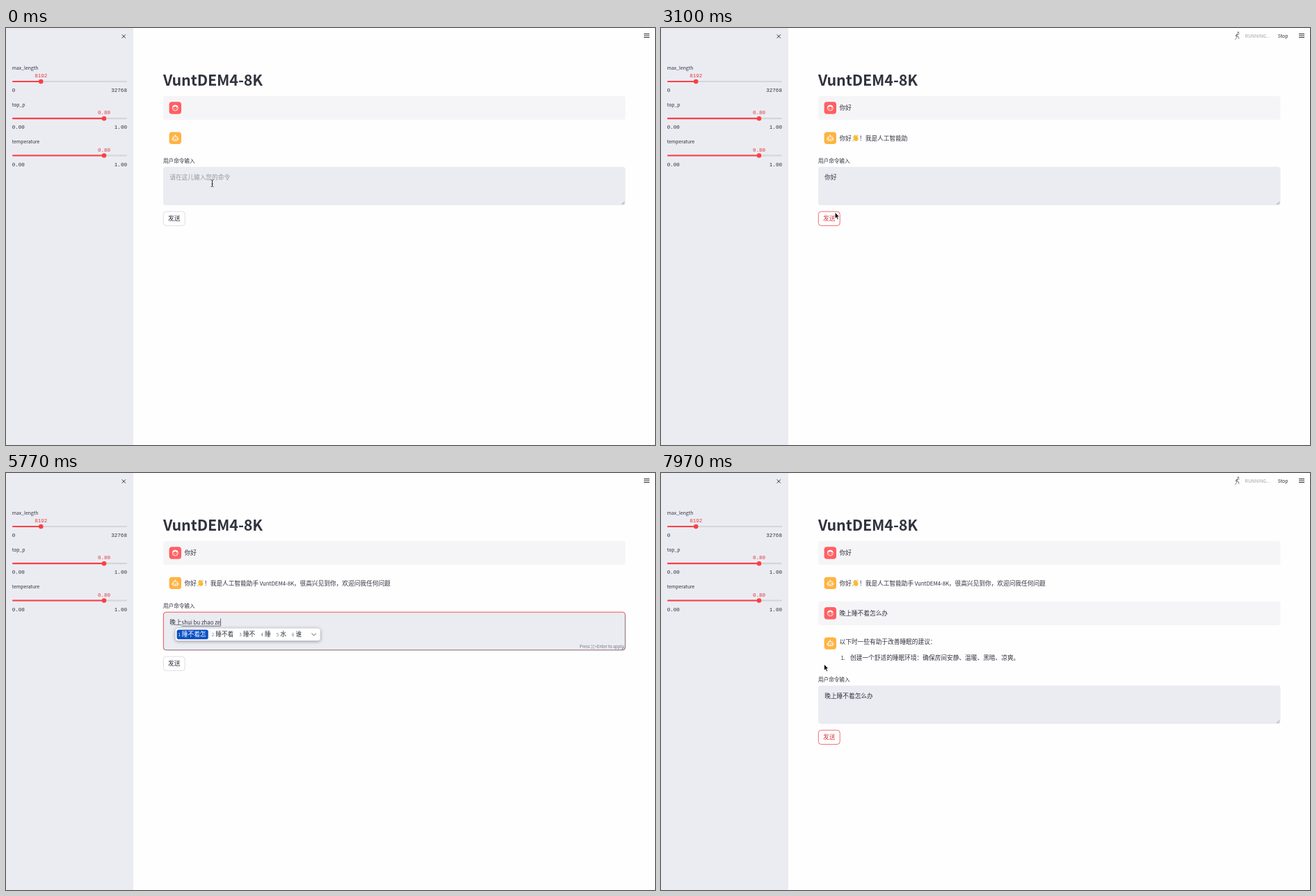
These frames come from a looping animation (933 px wide and 600 px high, 8000 ms). An HTML page:

```html
<!DOCTYPE html>
<html lang="zh-CN">
<head>
<meta charset="utf-8">
<style>
html, body { margin: 0; width: 100%; height: 100%; overflow: hidden; background: #fefefe; }
svg { display: block; width: 100%; height: 100%; }
text { font-family: "Noto Sans CJK SC", "Noto Sans CJK JP", "Noto Sans CJK", "Noto Sans", sans-serif; fill: #31333f; white-space: pre; }
.mono { font-family: "Liberation Mono", monospace; }
</style>
</head>
<body>
<svg viewBox="0 0 933 600"><g id="base"></g><g id="live"></g></svg>
<script>
const LOOP = 8000, EM = 8.7, LATIN = 7.8, SMALL = 6.8;
const RED = '#fa4044', INK = '#31333f', PANEL = '#ebecf2';
const NAME = 'VuntDEM4-8K';
const $ = id => document.getElementById(id);
const pen = document.createElement('canvas').getContext('2d');
pen.font = `${LATIN}px "Noto Sans CJK SC", "Noto Sans CJK JP", "Noto Sans CJK", "Noto Sans", sans-serif`;

const text = (x, y, s, size = EM, attr = '') => `<text x="${x}" y="${y}" font-size="${size}" ${attr}>${s}</text>`;
const rect = (x, y, w, h, r, fill, attr = '') => `<rect x="${x}" y="${y}" width="${w}" height="${h}" rx="${r}" fill="${fill}" ${attr}/>`;
const line = (d, color, w = 1, attr = '') => `<path d="${d}" fill="none" stroke="${color}" stroke-width="${w}" ${attr}/>`;
const group = (x, y, body, attr = '') => `<g transform="translate(${x} ${y})" ${attr}>${body}</g>`;
const ramp = (t, a, b) => Math.min(1, Math.max(0, (t - a) / (b - a)));
const ease = k => k * k * (3 - 2 * k);
const within = (t, a, b) => t >= a && t < b;

// Fixed parts
function slider(y, label, share, value, min, max) {
  const x = 9 + 165 * share;
  const mono = (px, py, s, anchor, fill = INK) =>
    text(px, py, s, 7.6, `class="mono" text-anchor="${anchor}" style="fill:${fill}"`);
  return text(8.7, y - 17.2, label, SMALL) + mono(x, y - 6, value, 'middle', '#dc3c40') +
    rect(9, y - 1.1, 165, 2.2, 1, '#d3d5dc') + rect(9, y - 1.1, x - 9, 2.2, 1, RED) +
    `<circle cx="${x}" cy="${y}" r="3.3" fill="${RED}"/>` +
    mono(8.7, y + 15, min, 'start') + mono(174, y + 15, max, 'end');
}

$('base').innerHTML = rect(0, 0, 183, 600, 0, PANEL) +
  line('M166.7 9.4l5.2 5.2m0 -5.2l-5.2 5.2', INK, 1) +
  slider(77, 'max_length', .25, '8192', '0', '32768') +
  slider(130.2, 'top_p', .8, '0.80', '0.00', '1.00') +
  slider(183.5, 'temperature', .8, '0.80', '0.00', '1.00') +
  line('M917 8.5h8M917 11h8M917 13.5h8', INK, 1.1) +
  text(226, 82.6, NAME, 21.5, 'font-weight="700" letter-spacing="-.1"');

// Chat rows
function userRow(y, s) {
  return rect(226, y - 17.3, 664.5, 34.6, 4, '#f5f5f7') +
    group(243.3, y, rect(-8.7, -8.7, 17.4, 17.4, 4, '#ff5f63') +
      '<circle r="4" fill="none" stroke="#fff" stroke-width=".9"/>' +
      '<path d="M-3.9 -.7C-2 -.8 -.8 -1.6 -.2 -2.6C1 -1.2 2.4 -.7 3.9 -.9A4 4 0 0 0 -3.9 -.7Z" fill="#fff"/>' +
      '<circle cx="-1.5" cy=".9" r=".6" fill="#fff"/><circle cx="1.5" cy=".9" r=".6" fill="#fff"/>') +
    text(256.5, y + 3.1, s);
}
function botRow(y) {
  return group(243.3, y, rect(-8.7, -8.7, 17.4, 17.4, 4, '#ffb340') +
    line('M-3 -2.2h6v5.8h-6zM0 -2.2v-1.6M-3.2 .2h-1.3v2h1.3M3.2 .2h1.3v2h-1.3M-1.4 2.2h2.8', '#fff', .85) +
    '<circle cy="-4.1" r=".9" fill="#fff"/><circle cx="-1.3" cy=".2" r=".65" fill="#fff"/><circle cx="1.3" cy=".2" r=".65" fill="#fff"/>');
}
const WAVE = '<g transform="rotate(-28)" stroke="#f9b934" stroke-linecap="round">' +
  '<ellipse cx=".3" cy="1.7" rx="2.9" ry="2.7" fill="#f9b934" stroke="none"/>' +
  '<path d="M-1.7 1V-3M-.1 0V-4M1.4 0V-3.5M2.7 1V-2.2M-1.8 2.4L-3.6 .4" stroke-width="1.4"/></g>' +
  line('M2 -4.6q1.6 .5 2.1 2M-4.6 2.8q.3 1.6 1.9 2.1', '#b98a4a', .6);

const GREETING = [
  [256.5, '你好', EM], [279.6, '*'], [285, '！我是人工智能助手', EM],
  [364.8, NAME, LATIN], [413.8, '，很高兴见到你，欢迎问我任何问题。', EM]
];
function greeting(y, count) {
  let out = '';
  for (const [x, s, size] of GREETING) {
    if (count <= 0) break;
    out += size ? text(x, y + 3.1, s.slice(0, count), size) : group(x, y, WAVE);
    count -= s.length;
  }
  return out;
}
const ADVICE = '以下时一些有助于改善睡眠的建议：';
const ITEM = '创建一个舒适的睡眠环境：确保房间安静、温暖、黑暗、凉爽。';
const typed = (s, t, a, b) => s.slice(0, Math.round(s.length * ramp(t, a, b)));

// Pinyin input: key times, and candidates from a given letter count on
const steps = (start, gap, n) => Array.from({ length: n }, (_, i) => start + i * gap);
const INPUTS = [
  { before: '', keys: [870, 930, 1130, 1230, 1400], pinyin: 'ni hao', end: 1700, after: '你好',
    lists: { 1: '你 那 能 年 呢 拿 女 难 内', 2: '你 尼 泥 腻 妮 拟 逆 倪 祢', 5: '你好 拟好 你号 你 尼 泥 腻 妮' } },
  { before: '', keys: steps(4000, 90, 8), pinyin: 'wan shang', end: 4830, after: '晚上',
    lists: { 1: '我 为 无 五 玩 完 问 文 网', 3: '万 完 玩 晚 弯 湾 碗 挽 婉', 4: '晚上 万事 完善 万 完 玩 晚' } },
  { before: '晚上', keys: steps(4970, 70, 18), pinyin: 'shui bu zhao zen me ban', end: 6400, after: '晚上睡不着怎么办',
    lists: { 1: '是 上 时 说 谁 水 睡 啥 事', 4: '睡 水 谁 税 说 睡觉 水果', 5: '睡不 水部 谁不 睡 水 谁 税',
      7: '睡不着 睡不 水 睡 谁 税', 11: '睡不着怎 睡不着 睡不 睡 水 谁', 13: '睡不着怎么 睡不着 睡不找 睡不 睡 水',
      16: '睡不着怎么办 睡不着怎么 睡不着 睡不找 睡不 水' } }
];

function letters(pinyin, n) {
  let i = 0;
  while (n > 0) if (pinyin[i++] !== ' ') n--;
  return pinyin.slice(0, i);
}
function inputState(t) {
  const s = { value: '', comp: '', list: '', beat: t < 3500 ? 170 : 3500 };
  for (const p of INPUTS) {
    if (t < p.keys[0]) break;
    const n = p.keys.filter(k => k <= t).length;
    const open = t < p.end;
    s.value = open ? p.before : p.after;
    s.comp = open ? letters(p.pinyin, n) : '';
    s.list = open ? p.lists[Math.max(...Object.keys(p.lists).filter(k => k <= n))] : '';
    s.beat = Math.max(s.beat, open ? p.keys[n - 1] : p.end);
  }
  return s;
}
function candidates(x, list) {
  let at = x + 3.8, items = '';
  list.split(' ').forEach((word, i) => {
    const w = word.length * EM, style = i ? '' : 'style="fill:#fff"';
    if (!i) items += rect(x + 2, 225.4, w + 10.3, 13.8, 2.8, '#0b4fc4');
    items += text(at, 234.6, i + 1, 6, i ? 'style="fill:#666a75"' : style) + text(at + 5.4, 235.2, word, EM, style);
    at += w + 13.6;
  });
  const w = at - x + 18.4;
  return rect(x, 223.6, w, 17.6, 4, '#fff', 'style="filter:drop-shadow(0 1.5px 2.5px #0006)"') +
    items + line(`M${x + w - 12.4} 230.8l3.2 3.1l3.2 -3.1`, '#50535d', 1);
}

function inputArea(t, focus, caretOn) {
  const s = inputState(t), x = 235.2, selected = within(t, 3700, 4000);
  let out = rect(226, 199.8, 664.5, 55.2, 4, PANEL);
  out += line('M226.4 251V204q0 -3.8 3.8 -3.8H886.4q3.8 0 3.8 3.8', RED, .9, `opacity="${focus}"`) +
    line('M890.2 204V251q0 3.8 -3.8 3.8H230.2q-3.8 0 -3.8 -3.8', '#80555f', .9, `opacity="${focus}"`) +
    line('M885 254l4.2 -4.2M887.3 254l1.9 -1.9', '#70727c', .6);
  if (selected) out += rect(x, 209, 2 * EM, 12, 0, '#b0d0f6');
  out += t < 870 ? text(x, 218.2, '请在这儿输入您的命令', EM, 'style="fill:#95969f"') : text(x, 218.2, s.value);
  let end = x + s.value.length * EM;
  if (s.comp) {
    const w = pen.measureText(s.comp).width;
    out += text(end, 218.2, s.comp, LATIN) + line(`M${end} 220.2h${w}`, INK, .7);
    end += w;
  }
  if (caretOn && !selected && (t - s.beat) % 1000 < 500) out += line(`M${end + .4} 209.4v10.8`, INK, .7);
  if (within(t, 870, 2000) || within(t, 4000, 7080))
    out += text(888, 252.2, 'Press ⌘+Enter to apply', 5.85, 'text-anchor="end" style="fill:#70727c"');
  if (s.list) out += candidates(x + s.value.length * EM - 9, s.list);
  return out;
}

function sendButton(t) {
  const down = within(t, 2690, 2780) || within(t, 7040, 7120);
  const hot = within(t, 2620, 3500) || t >= 6930;
  return rect(226.3, 264.1, 30.9, 20.3, 4, down ? RED : '#fff', `stroke="${hot ? '#ee4a50' : '#d5d6da'}" stroke-width=".8"`) +
    text(233.1, 277.2, '发送', EM, `style="fill:${down ? '#fff' : hot ? '#dc3c40' : INK}"`);
}

function status(t) {
  const alpha = t < 4000 ? ramp(t, 2650, 2800) * (1 - .93 * ramp(t, 3590, 3760)) : ramp(t, 7150, 7350);
  if (!alpha) return '';
  const legs = Math.floor(t / 110) % 2
    ? 'M-.2 1L-1.6 3.2L-4.2 4.6M.2 1L2.2 2.6L2 5.8M.8 -2.6L-2.2 -1.8L-3 .2M1 -2.4L2.6 -.4L4.4 -.6'
    : 'M-.2 1L-.2 3.4L-2.6 5.6M.2 1L2.8 1.6L3.4 4.6M.8 -2.6L-1.2 -.8L-1 1M1 -2.4L2.8 -1.6L3.8 -3';
  const runner = '<circle cx="2.4" cy="-4.7" r="1.3" fill="#85878f"/>' + line('M1 -2.8L0 1', '#85878f', 1.8) + line(legs, '#85878f', 1);
  return `<g opacity="${alpha}">` + group(827.5, 11.2, runner) +
    text(839.6, 13.6, 'RUNNING...', SMALL, 'style="fill:#a3a4ab"') + text(886.8, 13.6, 'Stop', SMALL) + '</g>';
}

const PATH = [
  [0, 296.5, 223.5], [30, 295.5, 223.5], [2000, 295.5, 223.5], [2400, 238.8, 286.4], [2570, 238.8, 286.4],
  [2680, 240, 277.5], [2950, 240, 277.5], [3400, 278.8, 231], [6670, 278.8, 231], [6830, 218.2, 272.4],
  [6980, 234.5, 275.2], [LOOP, 234.5, 275.2]
];
function pointer(t) {
  if (within(t, 870, 2000) || within(t, 4000, 6670)) return '';
  const i = PATH.findIndex(p => p[0] > t), [t0, x0, y0] = PATH[i - 1], [t1, x1, y1] = PATH[i];
  const k = ease(ramp(t, t0, t1)), x = x0 + (x1 - x0) * k, y = y0 + (y1 - y0) * k;
  if (x > 226 && y < 255) {
    const beam = 'M-1.9 -4.8Q0 -4.8 0 -3.8Q0 -4.8 1.9 -4.8M0 -3.8V3.8M-1.9 4.8Q0 4.8 0 3.8Q0 4.8 1.9 4.8M-1 .9h2';
    return group(x, y, line(beam, '#fff', 1.8) + line(beam, '#111', .9));
  }
  return group(x, y, '<path d="M0 0V8.9L2 7L3.4 10.3L5 9.6L3.6 6.4H6.3Z" fill="#000" stroke="#fff" stroke-width=".7"/>');
}

function draw(t) {
  const focus = t < 3500 ? ramp(t, 170, 320) * (1 - ramp(t, 2690, 2840)) : ramp(t, 3500, 3650) * (1 - ramp(t, 7040, 7190));
  const caretOn = within(t, 170, 2690) || within(t, 3500, 7040);
  const asked = t >= 7300, listed = t >= 7530;
  let out = userRow(115, t < 2870 ? '' : '你好') + botRow(158.4) + greeting(158.4, Math.round(39 * ramp(t, 2930, 3550)));
  if (asked) out += userRow(201.8, '晚上睡不着怎么办') + botRow(245.1) +
    text(256.5, listed ? 246.4 : 248.2, typed(ADVICE, t, 7330, 7520));
  if (listed) out += text(258.4, 268.8, '1.', LATIN) + text(272, 268.8, typed(ITEM, t, 7530, 7960));
  const shift = listed ? 106 : asked ? 86.7 : 0;
  out += group(0, shift, text(226, 193.8, '用户命令输入', 7.6) + sendButton(t) + inputArea(t, focus, caretOn));
  $('live').innerHTML = out + status(t) + pointer(t);
}

const start = performance.now();
function tick() {
  draw((performance.now() - start) % LOOP);
  requestAnimationFrame(tick);
}
tick();
</script>
</body>
</html>
```
